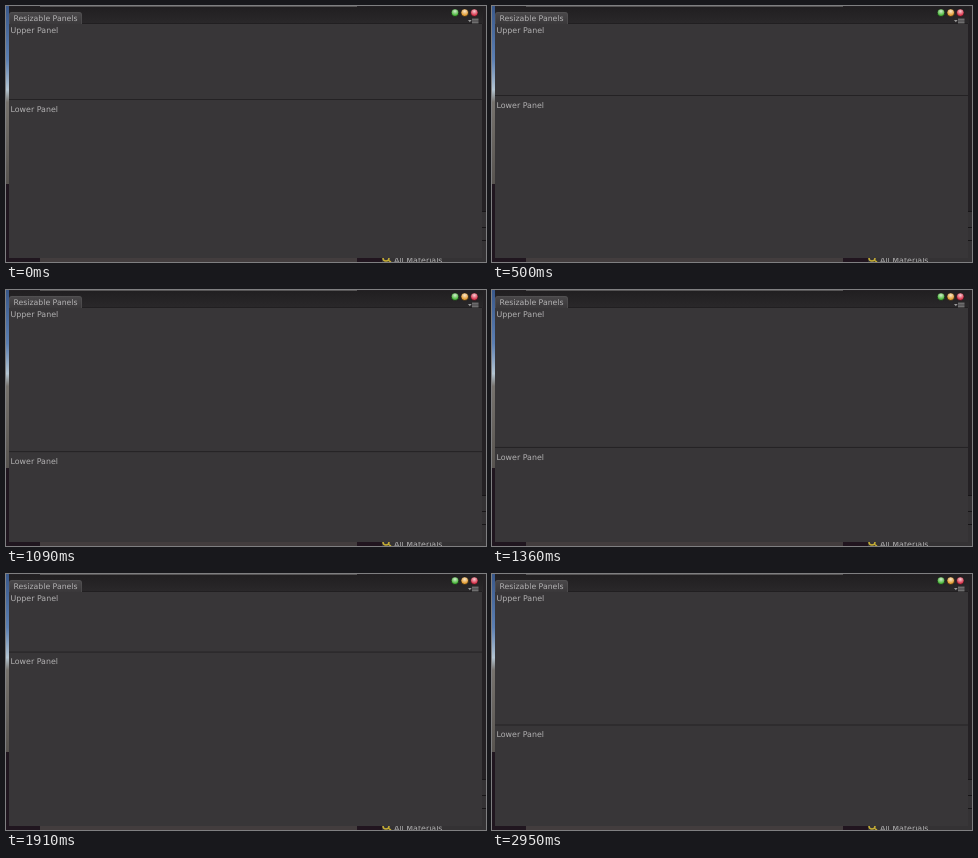
An HTML page that plays this animation: 480x256 px, repeating every 2990 ms.

```html
<!DOCTYPE html>
<html lang="en">
<head>
<meta charset="utf-8">
<title>Resizable Panels</title>
<style>
  html, body { margin: 0; width: 100%; height: 100%; overflow: hidden; background: #242224; }
  svg { display: block; width: 480px; height: 256px; }
  text { font: 7.9px "DejaVu Sans", Verdana, sans-serif; fill: #b2b1b2; }
</style>
</head>
<body>
<svg viewBox="0 0 480 256">
  <defs>
    <linearGradient id="sky" x2="0" y2="1">
      <stop offset="0" stop-color="#39588b"/>
      <stop offset=".3" stop-color="#5c80b4"/>
      <stop offset=".47" stop-color="#b4c5d2"/>
      <stop offset=".54" stop-color="#77736e"/>
      <stop offset="1" stop-color="#57534f"/>
    </linearGradient>
    <linearGradient id="bar" x2="0" y2="1">
      <stop offset="0" stop-color="#211f21"/>
      <stop offset="1" stop-color="#2a282a"/>
    </linearGradient>
    <linearGradient id="tab" x2="0" y2="1">
      <stop offset="0" stop-color="#4a484a"/>
      <stop offset="1" stop-color="#3a383a"/>
    </linearGradient>
    <radialGradient id="shine" cy=".3" r=".6">
      <stop offset="0" stop-color="#fff" stop-opacity=".75"/>
      <stop offset="1" stop-color="#fff" stop-opacity="0"/>
    </radialGradient>
  </defs>

  <!-- Desktop behind the window -->
  <rect width="480" height="256" fill="#242124"/>
  <rect width="3" height="178" fill="url(#sky)"/>
  <rect y="178" width="34" height="78" fill="#20161f"/>
  <rect x="34" width="317" height="2" fill="#565455"/>
  <rect x="34" y="252" width="317" height="4" fill="#433d3e"/>
  <rect x="351" y="252" width="25" height="4" fill="#21151f"/>
  <rect x="376" y="252" width="104" height="4" fill="#343234"/>
  <rect x="476" y="205" width="4" height="51" fill="#343234"/>
  <path d="M476 205.5h4M476 221.5h4M476 234.5h4" stroke="#171517"/>
  <circle cx="380" cy="252" r="3" fill="none" stroke="#c5ad35" stroke-width="1.5"/>
  <path d="M382 254l3 2" stroke="#c5ad35" stroke-width="1.5"/>
  <text x="388" y="256.5">All Materials</text>

  <!-- Window -->
  <rect x="3" y="1" width="474" height="17" fill="url(#bar)"/>
  <rect x="3" y="18" width="473" height="234" fill="#383638"/>
  <path d="M76 17.5H476" stroke="#211f21"/>
  <path d="M3 18V9q0-3 3-3H73q3 0 3 3V18z" fill="url(#tab)"/>
  <path d="M3.5 18V9q0-2.5 2.5-2.5H73q2.5 0 2.5 2.5V18" fill="none" stroke="#565456" stroke-width=".6"/>
  <text x="7.5" y="15" style="font-size:7.75px">Resizable Panels</text>
  <g id="buttons"></g>
  <path d="M462 14h3.6l-1.8 2.2z" fill="#999"/>
  <path d="M466 13.2h6.5M466 15h6.5M466 16.8h6.5" stroke="#999" stroke-width=".9"/>
  <text x="4.5" y="27">Upper Panel</text>
  <g id="lower">
    <path d="M3 0H476" stroke="#242224"/>
    <text x="4.5" y="12.2">Lower Panel</text>
  </g>
</svg>
<script>
const LOOP = 2990, FRAME = 1000 / 22;

// Divider drag: [time, y], eased to rest at every turning point
const drag = [
  [0, 93.5], [30, 93.5], [210, 114], [500, 89.5], [710, 76], [1090, 161.5],
  [1210, 175], [1590, 112.5], [1910, 78], [1940, 77], [2320, 124], [2700, 151], [2990, 151]
];

const pitch = i => drag[i + 1] ? (drag[i + 1][1] - drag[i][1]) / (drag[i + 1][0] - drag[i][0]) : 0;

function tangent(i) {
  const a = i ? pitch(i - 1) : 0, b = pitch(i);
  return a * b > 0 ? 2 * a * b / (a + b) : 0;
}

function dividerAt(t) {
  const i = Math.max(0, drag.findIndex(p => p[0] > t) - 1);
  const [t0, y0] = drag[i], [t1, y1] = drag[i + 1];
  const span = t1 - t0, u = (t - t0) / span, v = 1 - u;
  return v * v * (1 + 2 * u) * y0 + u * u * (1 + 2 * v) * y1
    + span * u * v * (v * tangent(i) - u * tangent(i + 1));
}

document.getElementById("buttons").innerHTML =
  [[449, "#45b535"], [458.7, "#e39a2c"], [468.3, "#d92f48"]].map(([x, color]) =>
    `<circle cx="${x}" cy="6.7" r="3.8" fill="${color}" stroke="#191719" stroke-width=".7"/>
     <circle cx="${x}" cy="6.7" r="3.4" fill="url(#shine)"/>`).join("");

const lower = document.getElementById("lower");

function draw(now) {
  const t = Math.floor(now % LOOP / 10) * 10;
  const step = Math.floor((t + 5) / FRAME);
  lower.setAttribute("transform", `translate(0 ${dividerAt(step * FRAME).toFixed(2)})`);
  requestAnimationFrame(draw);
}
draw(performance.now());
</script>
</body>
</html>
```
